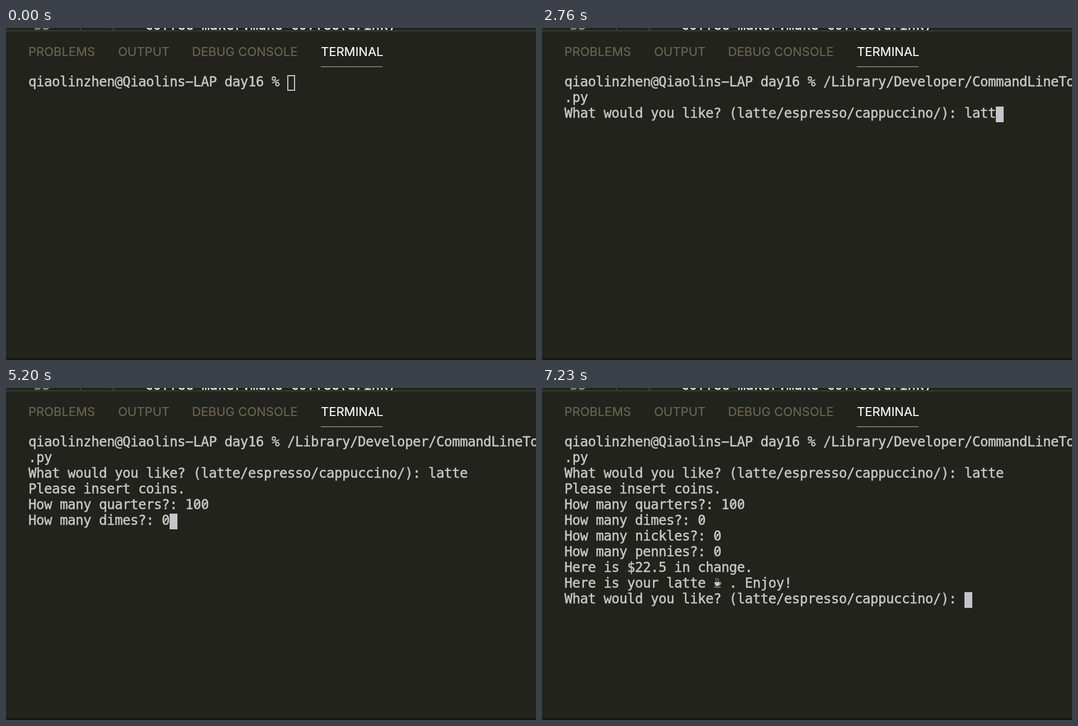
These frames come from a looping animation (946 by 592 pixels, 8000 ms). An HTML page with a canvas:

```html
<!DOCTYPE html>
<html lang="en">
<head>
<meta charset="utf-8">
<title>Coffee machine terminal</title>
<style>
  html, body { margin: 0; width: 100%; height: 100%; overflow: hidden; background: #22231d; }
  canvas { display: block; }
</style>
</head>
<body>
<canvas id="stage" width="946" height="592"></canvas>
<script>
const ctx = document.getElementById('stage').getContext('2d');
const LOOP = 8000;
const CELL = { w: 14, h: 28, left: 40, top: 84, baseline: 20 };
const MONO = '24px "DejaVu Sans Mono", monospace';
const SANS = '22px Inter, sans-serif';
const COLORS = {
  back: '#22231d', text: '#c8c8c8', cursor: '#c5c5c9', tab: '#69654f',
  active: '#fbfbf8', underline: '#75715e', rule: '#3b3c36', guide: '#42433c', edge: '#1a1514'
};
const QUESTION = 'What would you like? (latte/espresso/cappuccino/): ';

// Terminal output and keystrokes: [time, appended text]
const output = [
  [0, 'qiaolinzhen@Qiaolins\u2212LAP day16 % '],
  [500, '/Library/Developer/CommandLineTools\n.py\n'],
  [600, QUESTION],
  [2200, 'l'], [2360, 'a'], [2600, 't'], [2730, 't'], [2830, 'e'],
  [3000, '\nPlease insert coins.\nHow many quarters?: '],
  [4430, '1'], [4560, '0'], [4700, '0'],
  [4830, '\nHow many dimes?: '],
  [5160, '0'],
  [5260, '\nHow many nickles?: '],
  [5430, '0'],
  [5560, '\nHow many pennies?: '],
  [5660, '0'],
  [6200, '\nHere is $22.5 in change.\nHere is your latte \u2615 . Enjoy!\n' + QUESTION]
];
const FOCUS_TIME = 1530;

// Pointer positions: [time, x, y]
const pointerPath = [
  [1130, 818, 175], [1160, 772, 296], [1200, 712, 382], [1360, 704, 393],
  [1400, 693, 407], [1430, 683, 418], [1460, 677, 425]
];
const POINTER_HIDE = 2160;

function rect(x, y, w, h, color) {
  ctx.fillStyle = color;
  ctx.fillRect(x, y, w, h);
}

function stroke(path, width, color) {
  ctx.lineWidth = width;
  ctx.strokeStyle = color;
  ctx.stroke(new Path2D(path));
}

// A hairline outline gives text the weight of smoothed desktop type.
function label(text, x, y, font, color, outline) {
  ctx.font = font;
  ctx.fillStyle = ctx.strokeStyle = color;
  ctx.lineWidth = outline;
  ctx.lineJoin = 'round';
  ctx.fillText(text, x, y);
  ctx.strokeText(text, x, y);
}

function drawEditorEdge() {
  ctx.save();
  ctx.beginPath();
  ctx.rect(0, 0, 946, 4);
  ctx.clip();
  rect(132, 0, 2, 4, COLORS.guide);
  rect(190, 0, 2, 4, COLORS.guide);
  label('33', 50, 3, MONO, '#8f908a', 0.5);
  label('coffee_maker.make_coffee(drink)', 248, 3, MONO, '#f8f8f2', 0.5);
  ctx.restore();
  rect(0, 4, 946, 2, COLORS.rule);
}

function drawTabs() {
  label('PROBLEMS', 40, 50, SANS, COLORS.tab, 0.2);
  label('OUTPUT', 200, 50, SANS, COLORS.tab, 0.2);
  label('DEBUG CONSOLE', 332, 50, SANS, COLORS.tab, 0.2);
  label('TERMINAL', 562, 50, SANS, COLORS.active, 0.2);
  rect(562, 68, 110, 2, COLORS.underline);
}

function drawCup(x, y) {
  ctx.save();
  ctx.translate(x, y);
  stroke('M5 -17q-2 2 0 3t0 3M8.500 -17q-2 2 0 3t0 3', 1, COLORS.text);
  stroke('M11 -9q3 -1 2 2q-1 2 -3 2M1 -1h12', 1.2, COLORS.text);
  ctx.fillStyle = COLORS.text;
  ctx.fill(new Path2D('M2 -10H11.5Q11.5 -5 9 -3H4.500Q2 -5 2 -10Z'));
  ctx.restore();
}

function drawChar(char, x, y) {
  if (char === '\u2615') return drawCup(x, y);
  label(char, x, y, MONO, COLORS.text, 0.5);
  if (char === '0') stroke(`M${x + 4.5} ${y - 4.5}L${x + 10} ${y - 13}`, 1.6, COLORS.text);
}

function drawTerminal(time) {
  const lines = output.filter(([start]) => time >= start).map(([, text]) => text).join('').split('\n');
  lines.forEach((line, row) => {
    const y = CELL.top + row * CELL.h + CELL.baseline;
    [...line].forEach((char, col) => drawChar(char, CELL.left + col * CELL.w, y));
  });
  const row = lines.length - 1;
  const x = CELL.left + lines[row].length * CELL.w;
  const y = CELL.top + row * CELL.h;
  rect(x, y, CELL.w, CELL.h, COLORS.cursor);
  if (time < FOCUS_TIME) rect(x + 2, y + 2, CELL.w - 4, CELL.h - 4, COLORS.back);
}

function drawPointer(time) {
  if (time < pointerPath[0][0] || time >= POINTER_HIDE) return;
  const [, x, y] = pointerPath.filter(([start]) => time >= start).pop();
  ctx.save();
  ctx.translate(x, y);
  stroke('M-6.500 -15H-4Q0 -15 0 -11V11Q0 15 -4 15H-6.500M6.500 -15H4Q0 -15 0 -11M0 11Q0 15 4 15H6.500M-3 1H3', 2, '#fff');
  ctx.restore();
}

function frame(now) {
  const time = now % LOOP;
  rect(0, 0, 946, 592, COLORS.back);
  drawEditorEdge();
  drawTabs();
  drawTerminal(time);
  drawPointer(time);
  rect(0, 589, 946, 3, COLORS.edge);
  requestAnimationFrame(frame);
}

frame(0);
</script>
</body>
</html>
```
